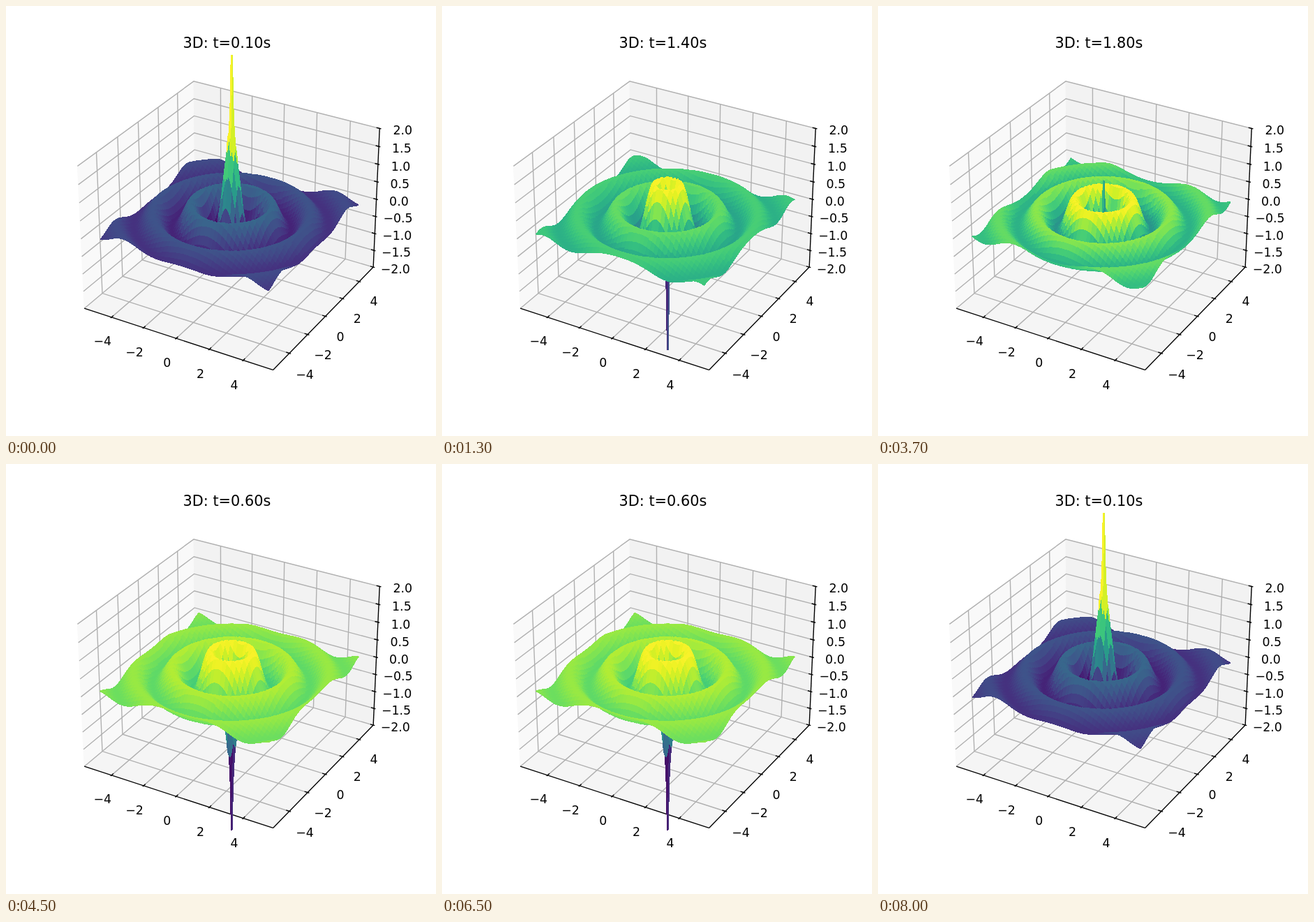
An HTML page with a canvas that plays this animation: 616x616 px, repeating every 8.1 s.

```html
<!DOCTYPE html>
<html lang="en">
<head>
<meta charset="utf-8">
<title>3D wave</title>
<style>
  html, body { margin: 0; width: 100%; height: 100%; overflow: hidden; background: #fff; }
  svg, canvas { position: absolute; left: 0; top: 0; width: 616px; height: 616px; }
  text { font-family: "DejaVu Sans", Verdana, sans-serif; font-size: 17.36px; text-anchor: middle; }
  #title { font-size: 20.83px; }
</style>
</head>
<body>
<svg id="axes" viewBox="0 0 616 616"><text id="title" x="316.4" y="60.4"></text></svg>
<canvas id="surface" width="616" height="616"></canvas>
<script>
const SIZE = 616, STEP = 100, LOOP = 8100, CYCLE = 20;

// Camera: elevation 30 deg, azimuth -60 deg, perspective distance 10
const LIM = 5.729, ZLIM = 2, HALF = 0.595238, HALF_Z = 0.446429;
const SCALE = 2601.3, CX = 323, CY = 304.7;
const CLIP_TOP = 70.5, CLIP_BOTTOM = 551.9;
const C30 = Math.sqrt(3) / 2;

function project(x, y, z) {
  const a = x / LIM * HALF, b = y / LIM * HALF, c = z / ZLIM * HALF_Z;
  const depth = 10 - (C30 / 2 * a - 0.75 * b + 0.5 * c);
  return [
    CX + SCALE * (C30 * a + 0.5 * b) / depth,
    CY - SCALE * (-0.25 * a + C30 / 2 * b + C30 * c) / depth,
    1 / depth
  ];
}

// ---- Axes ----
const svg = document.getElementById('axes');
const title = document.getElementById('title');

function add(tag, attrs, text) {
  const el = document.createElementNS('http://www.w3.org/2000/svg', tag);
  for (const key in attrs) el.setAttribute(key, attrs[key]);
  if (text) el.textContent = text;
  svg.insertBefore(el, title);
}

const toPoints = list => list.map(p => project(...p).slice(0, 2).map(v => v.toFixed(2)).join()).join(' ');
const pane = (color, ...pts) =>
  add('polygon', { points: toPoints(pts), fill: color, stroke: color, 'stroke-width': 1 });
const line = (color, ...pts) =>
  add('polyline', { points: toPoints(pts), fill: 'none', stroke: color, 'stroke-width': 1.39 });

function label(text, ...pos) {
  const [x, y] = project(...pos);
  add('text', { x: x.toFixed(2), y: (y + 13.2).toFixed(2) }, text.replace('-', '\u2212'));
}

function drawAxes() {
  const L = LIM, Z = ZLIM, grid = '#b0b0b0';
  const out = L * 1.016, inn = L * 0.968, far = L * 1.159, low = -Z * 1.159;
  const marks = [-4, -2, 0, 2, 4];
  const heights = Array.from({ length: 9 }, (_, i) => -2 + i / 2);

  pane('#f9f9f9', [-L, -L, -Z], [-L, L, -Z], [-L, L, Z], [-L, -L, Z]);
  pane('#f2f2f2', [-L, L, -Z], [L, L, -Z], [L, L, Z], [-L, L, Z]);
  pane('#f5f5f5', [-L, -L, -Z], [L, -L, -Z], [L, L, -Z], [-L, L, -Z]);

  for (const v of marks) {
    line(grid, [v, -L, -Z], [v, L, -Z], [v, L, Z]);
    line(grid, [L, v, -Z], [-L, v, -Z], [-L, v, Z]);
  }
  for (const h of heights) line(grid, [-L, -L, h], [-L, L, h], [L, L, h]);

  line('#000', [-L, -L, -Z], [L, -L, -Z]);
  line('#000', [L, -L, -Z], [L, L, -Z]);
  line('#000', [L, L, -Z], [L, L, Z]);

  for (const v of marks) {
    line('#000', [v, -out, -Z], [v, -inn, -Z]);
    label(String(v), v, -far, low);
    line('#000', [out, v, -Z], [inn, v, -Z]);
    label(String(v), far, v, low);
  }
  for (const h of heights) {
    line('#000', [out, L, h], [inn, L, h]);
    label(h.toFixed(1), far, far, h);
  }
}

// ---- Wave surface ----
const N = 200, STRIDE = 4, RANGE = 5, EDGE = 0.868;
const coord = i => -RANGE + 2 * RANGE * i / (N - 1);
const wave = (r, t) => Math.cos(Math.PI * r - 2 * Math.PI * t) / Math.sqrt(r) * Math.exp(-0.2 * r);

// Viridis as a degree-6 polynomial for each channel
const VIRIDIS = [
  [0.27773, 0.10509, -0.33086, -4.63423, 6.22827, 4.77638, -5.43546],
  [0.00541, 1.40461, 0.21485, -5.7991, 14.17993, -13.74515, 4.64585],
  [0.3341, 1.38459, 0.0951, -19.33244, 56.69055, -65.35303, 26.31244]
];
const viridis = v => VIRIDIS.map(c => c.reduceRight((sum, k) => sum * v + k, 0));

// Video colour: BT.709 encoding shown through BT.601 decoding
function videoColor([r, g, b]) {
  const y = 0.2126 * r + 0.7152 * g + 0.0722 * b;
  const cb = (b - y) / 1.8556, cr = (r - y) / 1.5748;
  return [y + 1.402 * cr, y - 0.3441 * cb - 0.7141 * cr, y + 1.772 * cb];
}

function pack(rgb) {
  const [r, g, b] = rgb.map(v => Math.round(255 * Math.min(1, Math.max(0, v))));
  return (255 << 24 | b << 16 | g << 8 | r) >>> 0;
}

// Outline of every patch as grid indices
const stops = [];
for (let i = 0; i < N - 1; i += STRIDE) stops.push(i);
stops.push(N - 1);

const outlines = [];
for (let j = 0; j + 1 < stops.length; j++) {
  for (let i = 0; i + 1 < stops.length; i++) {
    const top = stops[j], bottom = stops[j + 1], left = stops[i], right = stops[i + 1];
    const ring = [];
    for (let x = left; x < right; x++) ring.push(top * N + x);
    for (let y = top; y < bottom; y++) ring.push(y * N + right);
    for (let x = right; x > left; x--) ring.push(bottom * N + x);
    for (let y = bottom; y > top; y--) ring.push(y * N + left);
    outlines.push(ring);
  }
}

const firstRow = y => Math.ceil(Math.max(y, CLIP_TOP) - 0.5);
const endRow = y => Math.ceil(Math.min(y, CLIP_BOTTOM) - 0.5);

// Hard-edged scanline fill, non-zero winding
function fillPatch(pixels, pts, color) {
  let min = Infinity, max = -Infinity;
  for (const p of pts) {
    min = Math.min(min, p[1]);
    max = Math.max(max, p[1]);
  }
  for (let row = firstRow(min), end = endRow(max); row < end; row++) {
    const y = row + 0.5, hits = [];
    for (let i = 0; i < pts.length; i++) {
      const a = pts[i], b = pts[(i + 1) % pts.length];
      if ((a[1] <= y) === (b[1] <= y)) continue;
      hits.push([a[0] + (y - a[1]) / (b[1] - a[1]) * (b[0] - a[0]), a[1] < b[1] ? 1 : -1]);
    }
    hits.sort((p, q) => p[0] - q[0]);
    let wind = 0;
    for (let i = 0; i + 1 < hits.length; i++) {
      wind += hits[i][1];
      if (!wind) continue;
      const from = Math.max(0, Math.ceil(hits[i][0] - 0.5));
      const to = Math.min(SIZE, Math.ceil(hits[i + 1][0] - 0.5));
      if (to > from) pixels.fill(color, row * SIZE + from, row * SIZE + to);
    }
  }
}

// Hard-edged outline: every pixel centre within EDGE of a side
function strokePatch(pixels, pts, color) {
  for (let i = 0; i < pts.length; i++) {
    const [ax, ay] = pts[i], [bx, by] = pts[(i + 1) % pts.length];
    const dx = bx - ax, dy = by - ay, len2 = dx * dx + dy * dy || 1e-9;
    const left = Math.ceil(Math.min(ax, bx) - EDGE - 0.5);
    const right = Math.ceil(Math.max(ax, bx) + EDGE - 0.5);
    const end = endRow(Math.max(ay, by) + EDGE);
    for (let row = firstRow(Math.min(ay, by) - EDGE); row < end; row++) {
      for (let col = left; col < right; col++) {
        const px = col + 0.5 - ax, py = row + 0.5 - ay;
        const s = Math.min(1, Math.max(0, (px * dx + py * dy) / len2));
        const ex = px - s * dx, ey = py - s * dy;
        if (ex * ex + ey * ey <= EDGE * EDGE) pixels[row * SIZE + col] = color;
      }
    }
  }
}

function renderSurface(t) {
  const image = new ImageData(SIZE, SIZE);
  const pixels = new Uint32Array(image.data.buffer);
  const heights = new Float64Array(N * N), points = [];
  for (let j = 0; j < N; j++) {
    for (let i = 0; i < N; i++) {
      const x = coord(i), y = coord(j), z = wave(Math.hypot(x, y), t);
      heights[j * N + i] = z;
      points.push(project(x, y, z));
    }
  }
  const patches = outlines.map(ring => {
    let z = 0, near = 0;
    for (const k of ring) {
      z += heights[k];
      near += points[k][2];
    }
    return { ring, z: z / ring.length, near: near / ring.length };
  });
  const levels = patches.map(p => p.z);
  const lo = Math.min(...levels), hi = Math.max(...levels);
  patches.sort((a, b) => a.near - b.near);
  for (const p of patches) {
    const color = pack(videoColor(viridis((p.z - lo) / (hi - lo))));
    const pts = p.ring.map(k => points[k]);
    fillPatch(pixels, pts, color);
    strokePatch(pixels, pts, color);
  }
  return image;
}

// ---- Playback ----
const ctx = document.getElementById('surface').getContext('2d');
const cache = [];
let shown = -1;

function show(ms) {
  const tick = (Math.floor(ms % LOOP / STEP) + 1) % CYCLE;
  if (tick === shown) return;
  shown = tick;
  const t = tick / 10;
  cache[tick] = cache[tick] || renderSurface(t);
  ctx.putImageData(cache[tick], 0, 0);
  title.textContent = `3D: t=${t.toFixed(2)}s`;
}

drawAxes();
const start = performance.now();
function frame() {
  show(performance.now() - start);
  requestAnimationFrame(frame);
}
frame();
</script>
</body>
</html>
```
